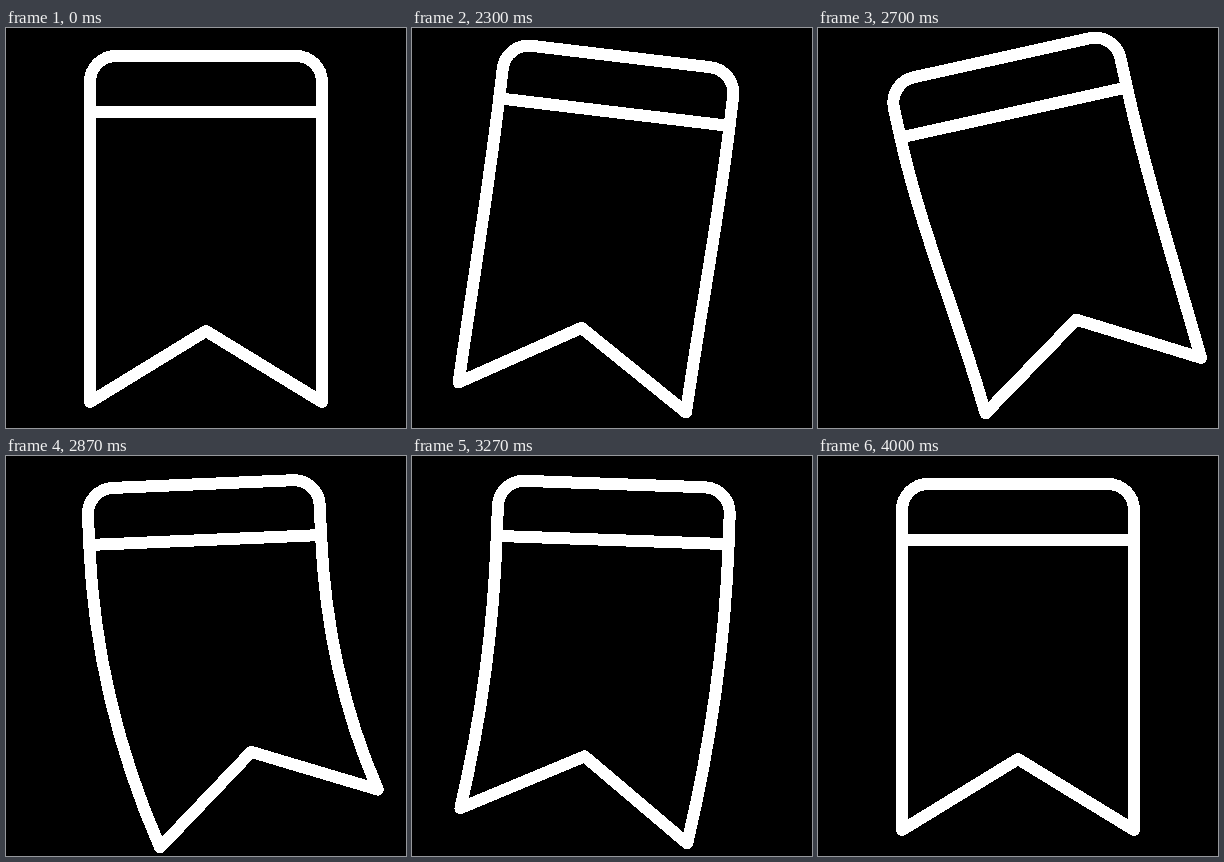
An HTML page that plays this animation: 400 by 400 pixels, repeating every 4.02 s.

```html
<!DOCTYPE html>
<html lang="en">
<head>
<meta charset="utf-8">
<title>Bookmark</title>
<style>
  html, body { margin: 0; height: 100%; overflow: hidden; background: #000; }
  svg { display: block; width: 100vw; height: 100vh; }
</style>
</head>
<body>
<svg viewBox="0 0 400 400" fill="none" stroke="#fff" stroke-width="12" stroke-linecap="round" stroke-linejoin="round" shape-rendering="crispEdges">
  <path id="cap" d="M84 84V54a26 26 0 0 1 26-26H290a26 26 0 0 1 26 26V84Z"/>
  <path id="ribbon"/>
</svg>
<script>
const LOOP = 4020, PIVOT = [200, 104], HALF = 116, NOTCH = 71;
const cap = document.getElementById('cap');
const ribbon = document.getElementById('ribbon');

// Turning points as [time, value]; the tail follows the cap with a delay
const capTurns = [[2000, 0], [2210, 10], [2600, -14.7], [3055, 4.2], [3480, 0]];
const swayTurns = [[2000, 0], [2340, -41], [2765, 82], [3180, -43], [3670, 15], [3980, 0]];

// Swings from one turning point to the next along a half cosine
function swing(turns, t) {
  const next = turns.findIndex(([time]) => time > t);
  if (next < 1) return 0;
  const [[t0, a], [t1, b]] = turns.slice(next - 1, next + 1);
  return a + (b - a) * (1 - Math.cos(Math.PI * (t - t0) / (t1 - t0))) / 2;
}

const tiltAt = t => -0.25 * swing(swayTurns, t) - 0.35 * swing(capTurns, t);

function turn(x, y, degrees, [cx, cy]) {
  const a = degrees * Math.PI / 180, s = Math.sin(a), c = Math.cos(a);
  return [cx + x * c - y * s, cy + x * s + y * c];
}

function draw() {
  const t = performance.now() % LOOP;
  const angle = swing(capTurns, t), sway = swing(swayTurns, t);
  const tilt = tiltAt(t), bend = 1.4 * tiltAt(t - 40);
  const lift = sway * sway / 345, squeeze = 1 - lift / 400;
  const tail = [200 + sway, 374 - lift];

  const edge = side => {
    const top = turn(side * HALF, 84 - PIVOT[1], angle, PIVOT);
    const tip = turn(side * HALF * squeeze, 0, tilt, tail);
    const reach = Math.hypot(tip[0] - top[0], tip[1] - top[1]) / 3;
    return [top, turn(0, reach, angle, top), turn(0, -reach, bend, tip), tip];
  };
  const left = edge(-1), right = edge(1).reverse();
  const notch = turn(0, -NOTCH * squeeze, tilt, tail);

  cap.setAttribute('transform', `rotate(${angle} ${PIVOT})`);
  ribbon.setAttribute('d',
    `M${left[0]}C${left.slice(1)}L${notch}L${right[0]}C${right.slice(1)}`);
  requestAnimationFrame(draw);
}
draw();
</script>
</body>
</html>
```
